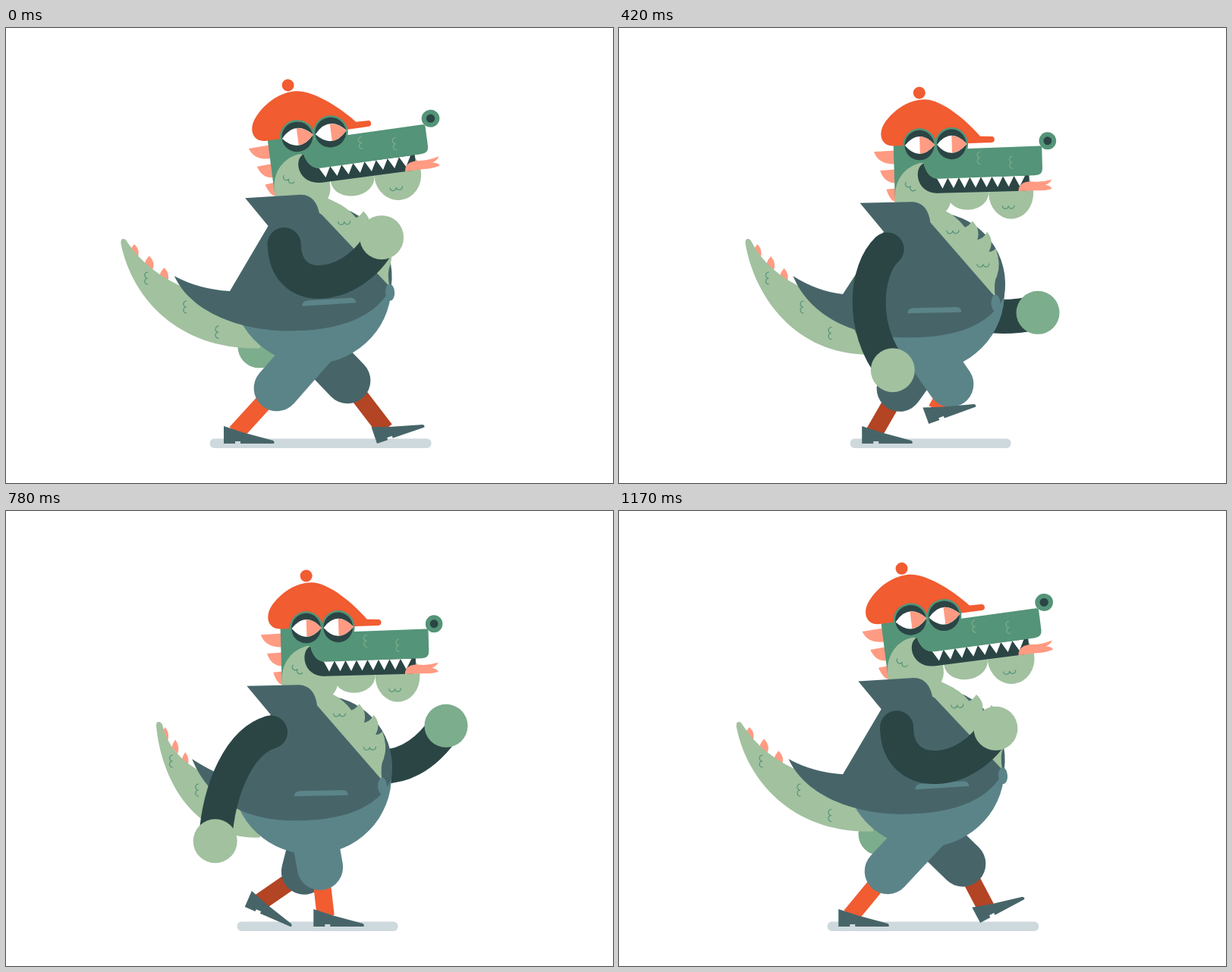
Write an HTML page with a canvas that moves like this. It is 800x600 px and loops after 1.2 s.

```html
<!DOCTYPE html>
<html lang="en">
<head>
<meta charset="utf-8">
<title>Walking crocodile</title>
<style>
  html, body { margin: 0; width: 100%; height: 100%; overflow: hidden; background: #fff; }
  canvas { display: block; width: 800px; height: 600px; }
</style>
</head>
<body>
<canvas id="stage" width="800" height="600"></canvas>
<script>
const ctx = document.getElementById('stage').getContext('2d');
const LOOP = 1200, HALF = 600, STEP = 30;
const { PI, cos, sin } = Math, RAD = PI / 180;

const C = {
  skin: '#a2c19f', hand: '#7cad8c', green: '#549478', dark: '#2b4545',
  coat: '#476569', pants: '#5b8489', red: '#f15c31', rust: '#b34424',
  pink: '#ff9b82', shadow: '#ced9dd', white: '#fff'
};

// Cosine of the walk cycle that peaks at the given time
const wave = (t, peak = 0, period = LOOP) => cos(2 * PI * (t - peak) / period);

function fill(color, d) {
  ctx.fillStyle = color;
  ctx.fill(new Path2D(d));
}
function stroke(color, width, d, cap = 'butt') {
  ctx.strokeStyle = color;
  ctx.lineWidth = width;
  ctx.lineCap = cap;
  ctx.stroke(new Path2D(d));
}
function oval(color, x, y, rx, ry = rx) {
  ctx.fillStyle = color;
  ctx.beginPath();
  ctx.ellipse(x, y, rx, ry, 0, 0, 2 * PI);
  ctx.fill();
}
function at(x, y, deg, draw, scaleX = 1) {
  ctx.save();
  ctx.translate(x, y);
  ctx.rotate(deg * RAD);
  ctx.scale(scaleX, 1);
  draw();
  ctx.restore();
}
const scales = (x, y, deg = 0, color = C.green) => at(x, y, deg, () =>
  stroke(color, 1.2, 'M-8-2a4 4 0 0 0 8 0a4 4 0 0 0 8 0', 'round'));

function shadow(t) {
  const p = t % HALF, half = 146 - .222 * Math.min(p, HALF - p);
  ctx.fillStyle = C.shadow;
  ctx.beginPath();
  ctx.roundRect(400 - half * .9, 541.5, half * 2, 12.5, 6);
  ctx.fill();
}

// Each hand swings on a circle; the bend point turns with it
function swing(x, y, radius, angle, bend) {
  const a = angle * RAD, b = (125 + 1.27 * angle) * RAD;
  const hx = x + radius * cos(a), hy = y + radius * sin(a);
  return { hx, hy, bx: hx + bend * cos(b), by: hy + bend * sin(b) };
}

function nearArm(t) {
  const s = wave(t, 55);
  const { hx, hy, bx, by } = swing(345, 300, 152, 60 - 72 * s, 72);
  const x = 357 + 10 * s, y = 290 - 5 * wave(t, 0, HALF);
  stroke(C.dark, 44, `M${x} ${y}C${336 + 34 * s} ${330 + 34 * s} ${bx} ${by} ${hx} ${hy}`);
  oval(C.dark, x, y, 22);
  oval(C.skin, hx, hy, 29);
}

function farArm(t) {
  const angle = 56 + 70 * wave(t, 60), a = (angle + 40) * RAD;
  const { hx, hy, bx, by } = swing(420, 285, 160, angle, 75);
  stroke(C.dark, 45, `M${420 + 80 * cos(a)} ${285 + 80 * sin(a)}Q${bx} ${by} ${hx} ${hy}`);
  oval(C.hand, hx, hy, 28.5);
}

// The foot swings forward for half the cycle, then slides back on the ground
function foot(t) {
  const u = t / HALF;
  const w = Math.min(1, u / 1.08) ** 1.2, tilt = sin(2 * PI * w);
  const path = u < 1 ? u * u * (1.75 - .75 * u) : (2 - u) ** 1.5;
  return {
    x: 287 + 202 * path,
    y: 548 - (u < 1 ? 32 * sin(PI * u) : 0),
    deg: tilt * (tilt > 0 ? 24 : 36)
  };
}

function leg(t, dy, cloth, sock) {
  t %= LOOP;
  const kx = 403.5 - 45 * (wave(t, -55) + .12 * wave(3 * t, -165));
  const ky = 472 + 5 * wave(t) - 2 * wave(t, 0, HALF);
  const { x, y, deg } = foot(t);
  const c = cos(deg * RAD), s = sin(deg * RAD);
  const ax = x + 16 * c + 14 * s, ay = y + 16 * s - 14 * c;
  stroke(sock, 23, `M${kx} ${ky}L${ax} ${ay}`);
  stroke(cloth, 60.5, `M406 ${428 + dy * .6}L${kx} ${ky}`, 'round');
  at(x, y, deg, () => fill(C.coat,
    'M0 0V-23L26-14.5L65-4Q67.500-2 66 0L22 0v-3h-7v3Z'));
}

function tail(tx, dy) {
  const ty = 280, k = (tx - 152) / 47, base = 435 + dy * .85;
  for (let i = 0; i < 3; i++)
    at(tx + 15 + 20 * i - (6 + 6.5 * i) * k, ty + 5 + 15.5 * i + i * k, 0, () =>
      fill(C.pink, 'M0 0Q-5 5-6 10L4 19Q9 9 0 0Z'), 1 - .25 * k);
  fill(C.skin, `M${tx - 3} ${ty + 5}Q${tx - 4} ${ty - 2} ${tx} ${ty - 2}Q${tx + 3} ${ty - 2} ${tx + 5} ${ty + 2}
    Q${185 + 29 * k} 323 ${240 + 19 * k} 345L330 360L335 ${base}
    C${230 + 15 * k} ${base + 3} ${165 + 38 * k} ${360 - 8 * k} ${tx - 3} ${ty + 5}Z`);
  scales(183 + 33 * k, 330, 90);
  scales(235 + 16 * k, 368, 90);
  scales(278, 401 + 4 * k, 90);
}

function eye(x) {
  at(x, 1, 0, () => {
    oval(C.green, 0, 0, 22.3);
    oval(C.dark, 0, 0, 19.8);
    fill(C.white, 'M-19.500 0Q0-23 20.500 0Q0 23-19.500 0Z');
    fill(C.pink, 'M.5-11.500Q10.500-11 20.500 0Q10.500 11 .5 11.500Z');
  });
}

function jaws() {
  scales(117, 86);
  fill(C.dark, 'M5 25C-9 30-7 65 24 65H140Q146 65 146 44L26 46C14 46 8 38 5 25Z');
  let teeth = '';
  for (let i = 0; i < 8; i++) teeth += `M${22 + i * 14.8} 45l7.400 14l7.400-14Z`;
  fill(C.white, teeth);
  fill(C.green, 'M-10 8L161 6.500Q164 6.500 164 9.500V36Q164 45 154 45L26 46C14 46 8 38 5 25L-10 20Z');
  scales(79, 20, 90, C.hand);
  scales(122, 27, 90, C.hand);
  fill(C.pink, 'M131 65Q132 52 149 53Q162 55 176 51Q174 56 167 58Q174 59 176 63Q168 66 155 65Z');
  oval(C.green, 172, 0, 11.5);
  oval(C.dark, 172, 0, 5.5);
}

function head(c, turn) {
  const wide = 1 + .029 * turn;
  const face = draw => at(3 * turn, 0, 0, draw, wide);
  at(394 - 15.5 * c + 1.8 * turn, 151 - 8.1 * c, -3 - 4.5 * c, () => {
    for (let i = 0; i < 3; i++) {
      const x = -62 + 7.5 * i, y = 7 + 25 * i;
      fill(C.pink, `M-34 ${y}L${x} ${y + 1}Q${x + 5} ${y + 18}-34 ${y + 18}Z`);
    }
    fill(C.green, 'M-36 0H24V70H-36Z');
    face(() => {
      oval(C.skin, 63, 66, 28, 22);
      oval(C.skin, 121, 67.5, 30, 34);
    });
    fill(C.skin, 'M-36 100V68A41 44 0 0 1 5 24L38 50V70Q38 82 30 90L20 100Z');
    scales(-16, 56, 40);
    face(jaws);
    oval(C.red, 0, -68, 8);
    at(0, 0, 0, () => fill(C.red,
      'M-37 1C-52 1-58-14-48-29C-35-47-14-59 6-59C30-59 64-28 80-8.500L95-8a4 4 0 0 1 0 8L-37 1Z'), wide);
    face(() => { eye(0); eye(43); });
  });
}

function body(dy, turn, tipX, drawLeg) {
  const deg = dy * .24, s = sin(deg * RAD), c = cos(deg * RAD);
  const P = (x, y) => {
    const u = x - 403, v = y - 355;
    return ` ${403 + u * c - v * s} ${355 + dy + u * s + v * c} `;
  };
  at(403, 355 + dy, deg, () => fill(C.pants, 'M105 0A105 103 0 0 1-105 0Z'));
  drawLeg();

  fill(C.coat, `M${tipX} 327Q${tipX + 32} ${349 + dy * .3} 295 ${353 + dy * .4}
    L${P(351, 272)}L${P(410, 262)}L${P(425, 249)}A95 95 0 0 1${P(507.5, 362)}
    C${P(488, 400)}${P(440, 414)}${P(385, 413)}
    C${P(320, 413)}${tipX + 25} ${390 + dy * .6} ${tipX} 327Z`);

  at(403, 355 + dy, deg, () => {
    ctx.translate(5.5 * turn - 403, -355);
    fill(C.skin, `M398 250L420 238L434 246Q450 254 461 269Q467 267 471 261
      Q482 272 477 286Q486 284 490 276Q500 287 492 302Q498 302 501 298
      Q508 318 502 334Q497 342 499 362L416 262Z`);
    scales(445, 275);
    scales(484, 320);
    fill(C.pants, 'M383 381Q383 374 391 374H448Q454 375 454 381Z');
    oval(C.pants, 499.5, 370, 6, 11);
  });
  const left = 321 + 1.5 * turn, right = 415 + 4 * turn;
  fill(C.coat, `M${P(left, 234)}L${P(right - 23, 234)}Q${P(right - 2, 236)}${P(right, 264)}L${P(420, 285)}L${P(351, 273)}Z`);
}

function draw(t) {
  const bob = wave(t, 0, HALF), dy = -7.5 * (1 + bob);
  const turn = 1.08 * wave(t, 8);
  const tailX = 174 - 27.5 * wave(t, 150);

  ctx.fillStyle = C.white;
  ctx.fillRect(0, 0, 800, 600);
  shadow(t);
  farArm(t);
  tail(tailX, dy);
  leg(t + HALF, dy, C.coat, C.rust);
  head(bob, turn);
  body(dy, turn, 218 + (tailX - 147) * .5, () => leg(t, dy, C.pants, C.red));
  nearArm(t);
}

const start = performance.now();
function tick() {
  const t = (performance.now() - start) % LOOP;
  draw(Math.floor(t / STEP) * STEP);
  requestAnimationFrame(tick);
}
tick();
</script>
</body>
</html>
```
